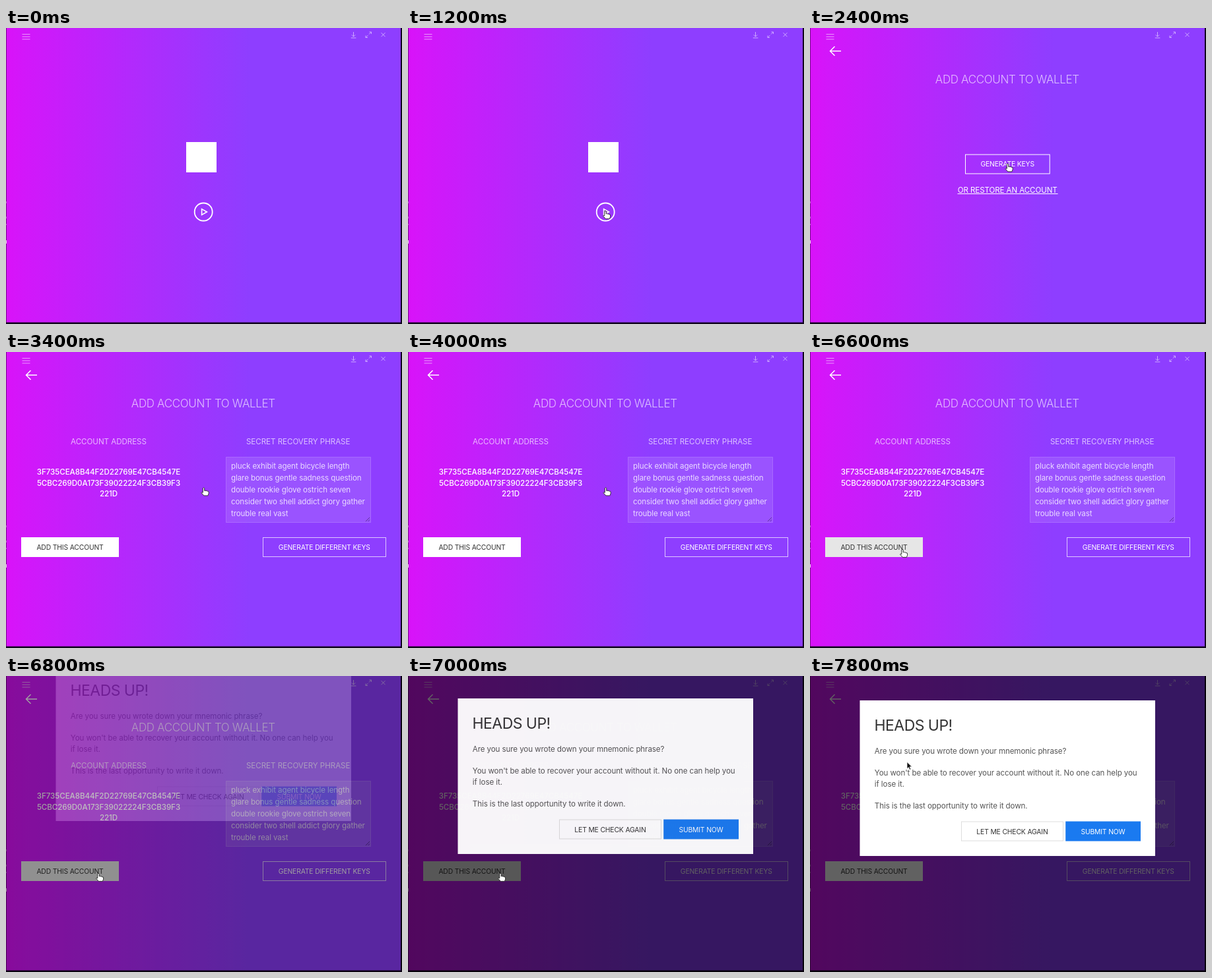
An HTML page for the animation above (8000 ms loop, 600 px wide and 449 px high).

```html
<!DOCTYPE html>
<html lang="en">
<head>
<meta charset="utf-8">
<title>Wallet</title>
<style>
  html, body { margin: 0; width: 100%; height: 100%; overflow: hidden; background: #12061f; }
  svg { display: block; width: 100%; height: 100%; }
  text { font-family: Inter, "Open Sans", sans-serif; fill: #fff; }
  .line { fill: none; stroke: #fff; }
  .mid { text-anchor: middle; }
  .head { font-size: 17px; font-weight: 300; letter-spacing: -.35px; opacity: .68; }
  .label { font-size: 11.6px; letter-spacing: -.05px; opacity: .68; }
  .body { font-size: 11.55px; letter-spacing: -.08px; }
  .code { font-size: 11.6px; font-weight: 500; letter-spacing: -.07px; }
  .btn { font-size: 10.35px; letter-spacing: -.15px; }
  .title { font-size: 23px; letter-spacing: -.55px; fill: #333; }
  .dark { fill: #333; }
  .grey { fill: #555; }
</style>
</head>
<body>
<svg viewBox="0 0 600 449" preserveAspectRatio="none">
  <defs>
    <linearGradient id="sky" gradientUnits="userSpaceOnUse" x1="0" y1="0" x2="370" y2="0">
      <stop offset="0" stop-color="#d912f9"/>
      <stop offset=".08" stop-color="#d217fa"/>
      <stop offset="1" stop-color="#8e3eff"/>
    </linearGradient>
  </defs>
  <rect width="600" height="449" fill="#12061f"/>
  <rect x=".5" width="597.5" height="446.5" fill="url(#sky)"/>
  <path d="M.5 322v5" class="line" opacity=".8"/>
  <path d="M.5 263v3M.5 286v3M.5 297v2" class="line" opacity=".35"/>

  <g class="line" opacity=".62" stroke-width=".9">
    <path d="M24.5 9.5h12M24.5 13.2h12M24.5 17h12"/>
    <path d="M526.5 6v7M523.8 10.4l2.7 2.7 2.7-2.7M522.8 15h7.6"/>
    <path d="M545 14.5l3.4-3.4M550 9.5l3.5-3.5M550.5 6h3v3M548 14.5h-3v-3"/>
    <path d="M568.5 7.2l6 6M574.5 7.2l-6 6"/>
  </g>

  <g id="home">
    <rect x="273" y="173" width="46" height="46" fill="#fff"/>
    <circle cx="299.2" cy="279" r="13.5" class="line" stroke-width="1.8"/>
    <path d="M296.6 274.6v8.8l7.8-4.4z" class="line" stroke-width="1.6"/>
  </g>

  <g id="top">
    <path d="M47 35H30.5M37.5 28l-7 7 7 7" class="line" stroke-width="1.5"/>
    <text class="head mid" x="298.8" y="84">ADD ACCOUNT TO WALLET</text>
  </g>

  <g id="add">
    <rect x="235.5" y="192" width="127.7" height="29" class="line"/>
    <text class="btn mid" x="299.2" y="210.3">GENERATE KEYS</text>
    <text class="body mid" x="299.2" y="249.7">OR RESTORE AN ACCOUNT</text>
    <path d="M223.5 251.5h152" class="line"/>
  </g>

  <g id="keys">
    <text class="label mid" x="155.5" y="140">ACCOUNT ADDRESS</text>
    <text class="label mid" x="442.7" y="140">SECRET RECOVERY PHRASE</text>
    <g id="hex"></g>
    <rect x="333.5" y="159.5" width="219" height="99" fill="#fff" fill-opacity=".11" stroke="#fff" stroke-opacity=".18"/>
    <g id="phrase" opacity=".78"></g>
    <path d="M545 257l6-6M548.5 257l2.5-2.5" fill="none" stroke="#000" stroke-width=".8" opacity=".5"/>
    <rect id="save" x="23" y="281" width="148" height="30" fill="#fff"/>
    <text class="btn mid dark" x="97" y="299.9">ADD THIS ACCOUNT</text>
    <rect x="389.5" y="281.5" width="186" height="29" class="line" stroke-opacity=".7"/>
    <text class="btn mid" x="482.3" y="299.9">GENERATE DIFFERENT KEYS</text>
  </g>

  <g id="modal">
    <rect width="600" height="449" fill="#000" opacity=".62"/>
    <g id="dialog">
      <rect x="75.5" y="37" width="447.5" height="236" fill="#fff"/>
      <text class="title" x="97.5" y="82.8">HEADS UP!</text>
      <g id="warning"></g>
      <rect x="229.5" y="221" width="154" height="29" fill="none" stroke="#ddd"/>
      <text class="btn mid dark" x="306.5" y="239.6">LET ME CHECK AGAIN</text>
      <rect x="387.2" y="220.5" width="113.8" height="30" fill="#1a7af0"/>
      <text class="btn mid" x="444" y="239.6">SUBMIT NOW</text>
    </g>
  </g>

  <g id="cursor">
    <path id="hand" fill="#fff" stroke="#222" stroke-width=".9" stroke-linejoin="round"
      d="M-1.2 1Q0-.6 1.2 1V5Q2.6 3.9 3.6 5.2Q5 4.5 5.8 5.8Q7.4 5.2 7.6 7V9.2L6.4 12.4H.4L-3.4 8.2Q-3.4 6.4-1.2 7.8z"/>
    <path id="arrow" fill="#111" stroke="#fff" stroke-width=".7" d="M0 0V10.2L2.4 8 4 11.7 5.8 11 4.2 7.3H7.4z"/>
  </g>
</svg>
<script>
const LOOP = 8000, STEP = 200;
const el = {};
document.querySelectorAll('svg [id]').forEach(n => el[n.id] = n);

function lines(group, cls, x, y, gap, rows) {
  group.innerHTML = rows.map((row, i) =>
    `<text class="${cls}" x="${x}" y="${y + i * gap}">${row}</text>`).join('');
}
lines(el.hex, 'code mid', 155.5, 186.3, 16.4,
  ['3F735CEA8B44F2D22769E47CB4547E', '5CBC269D0A173F39022224F3CB39F3', '221D']);
lines(el.phrase, 'body', 341, 177.3, 17.9, [
  'pluck exhibit agent bicycle length',
  'glare bonus gentle sadness question',
  'double rookie glove ostrich seven',
  'consider two shell addict glory gather',
  'trouble real vast'
]);
lines(el.warning, 'body grey', 97.8, 118, 16.6, [
  'Are you sure you wrote down your mnemonic phrase?', '',
  "You won't be able to recover your account without it. No one can help you",
  'if lose it.', '',
  'This is the last opportunity to write it down.'
]);

// Pointer stops: time, x, y
const stops = [
  [200, 345, 448], [1000, 299, 277], [1600, 299, 277], [2200, 299.5, 205.5],
  [4400, 299.5, 205.5], [5000, 376, 162], [5200, 376, 162], [6200, 140, 299],
  [7400, 140, 299], [7800, 147, 130.5]
];

const ramp = (t, a, b) => Math.min(1, Math.max(0, (t - a) / (b - a)));
const ease = p => p * p * (3 - 2 * p);
const fade = (node, p) => node.setAttribute('opacity', p);
const show = (node, on) => node.setAttribute('display', on ? 'inline' : 'none');
const move = (node, x, y) => node.setAttribute('transform', `translate(${x} ${y})`);

function pointer(t) {
  let [, x, y] = stops[0];
  for (let i = 1; i < stops.length; i++) {
    const p = ease(ramp(t, stops[i - 1][0], stops[i][0]));
    x += (stops[i][1] - x) * p;
    y += (stops[i][2] - y) * p;
  }
  return [x, y];
}

function draw(t) {
  fade(el.home, 1 - ramp(t, 1200, 1600));
  fade(el.top, ramp(t, 1500, 2000));
  fade(el.add, ramp(t, 1500, 2000) * (1 - ramp(t, 2600, 3000)));
  fade(el.keys, ramp(t, 2900, 3400));

  const drop = ramp(t, 6612, 7012);
  fade(el.modal, ramp(t, 6612, 6925));
  fade(el.dialog, drop ** 1.5);
  move(el.dialog, 0, -100 * (1 - drop));

  const hover = t >= 6200 && t < 7600;
  el.save.setAttribute('fill', hover ? '#e6e6e6' : '#fff');

  const hand = hover || (t >= 1000 && t < 1800) || (t >= 2200 && t <= 4400);
  move(el.cursor, ...pointer(t));
  show(el.cursor, t >= 200);
  show(el.hand, hand);
  show(el.arrow, !hand);
}

const start = performance.now();
function tick() {
  const t = (performance.now() - start) % LOOP;
  draw(Math.floor(t / STEP) * STEP);
  requestAnimationFrame(tick);
}
tick();
</script>
</body>
</html>
```
